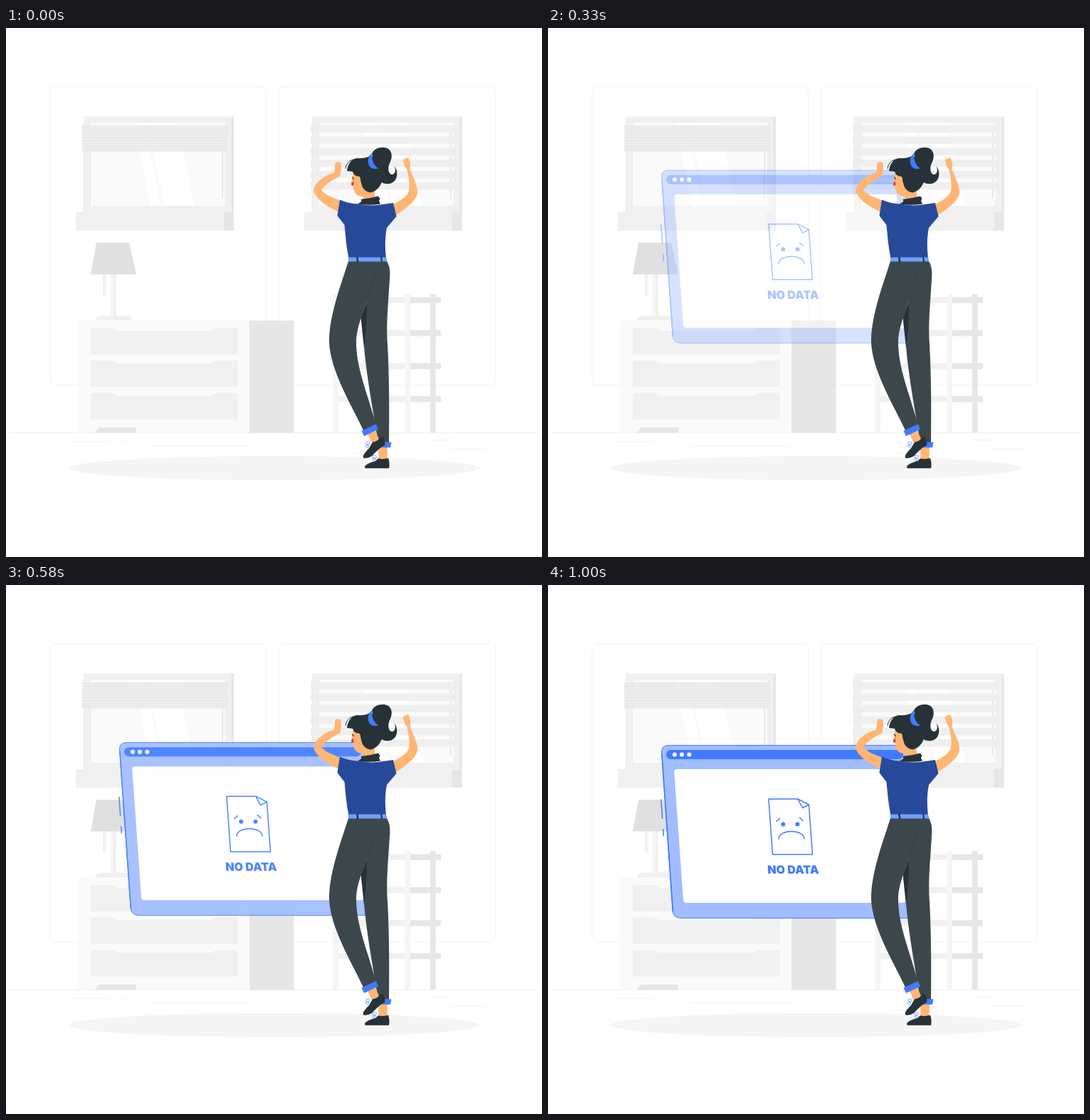
Animation, 753 px wide and 744 px high, one loop 1.04 s. Source, as an HTML page:

```html
<!DOCTYPE html>
<html lang="en">
<head>
<meta charset="utf-8">
<title>No data</title>
<style>
  html, body { margin: 0; width: 100%; height: 100%; overflow: hidden; background: #fff; }
  svg { display: block; width: 753px; height: 744px; }
  .skin { fill: #ffb573; }
  .dark { fill: #263238; }
  .pants { fill: #3c474c; }
  .blue { fill: #407bff; }
  .line { fill: none; stroke: #407bff; stroke-width: 1.5; stroke-linecap: round; stroke-linejoin: round; }
  text { font: 900 16px Inter, "DejaVu Sans", sans-serif; text-anchor: middle; }
</style>
</head>
<body>
<svg viewBox="0 0 753 744" xmlns="http://www.w3.org/2000/svg">
  <g fill="none" stroke="#f3f3f3">
    <rect x="62" y="82.5" width="303.5" height="419.5" rx="8"/>
    <rect x="383.5" y="82.5" width="304" height="419.5" rx="8"/>
    <path d="M5 569.5H748" stroke="#efefef"/>
    <path d="M93 581.5H147M160 581.5H168M200 588H340M597 579.5H623M624 592.5H673M488 598H503"/>
  </g>

  <defs>
    <g id="pane">
      <path fill="#f0f0f0" d="M109 124.5H317V285H109Z"/>
      <path fill="#e6e6e6" d="M316.5 124.5H320V285H306V259H316.5Z"/>
      <path fill="#e9e9e9" d="M109 133H110V259H109ZM117.5 133H119V250H117.5Z"/>
      <path fill="#fafafa" d="M119 133H308V250H119Z"/>
      <path fill="#fff" d="M179 133H194L218 250H203ZM198 133H240L265 250H223Z"/>
      <path fill="#f0f0f0" d="M98 259H306V285H98Z"/>
      <path fill="#e3e3e3" d="M303.5 145H305V240H303.5Z"/>
    </g>
  </defs>
  <use href="#pane"/>
  <use href="#pane" x="320.6"/>
  <g id="blinds"></g>

  <!-- shelf -->
  <g id="shelf">
    <path fill="#e6e6e6" d="M596 374H603.5V569H596Z"/>
    <path fill="#f5f5f5" d="M459.5 374H467V569H459.5ZM560.5 374H568V569H560.5Z"/>
  </g>

  <!-- lamp -->
  <path fill="#f0f0f0" d="M136 346H140.5V376H136ZM125 411.5Q126 404.5 133 404.5H169Q176 404.5 177 411.5Z"/>
  <path fill="#f5f5f5" d="M147 346H154.500V405H147Z"/>
  <path fill="#f0f0f0" d="M151 346H154.500V405H151Z"/>
  <path fill="#e0e0e0" d="M127 302H173L183 346.500H119Z"/>

  <!-- dresser -->
  <path fill="#fafafa" d="M101.500 411.500H342V569.500H101.500Z"/>
  <path fill="#e6e6e6" d="M342 411.500H404.500V569.500H342ZM131 562H183V569.500H124Z"/>
  <g id="drawers" fill="#f0f0f0"></g>

  <ellipse cx="376.500" cy="619" rx="288.500" ry="17" fill="#f5f5f5"/>

  <g id="screen">
    <path d="M169 225.500H496Q504 225.500 505 235L519 459Q519.500 468.500 511 468.500H187Q176 468.500 175 458L159.500 236Q159 225.500 169 225.500Z" fill="#a0bdff" stroke="#407bff"/>
    <path d="M160 238L175.500 459" class="line" stroke-width="1.200"/>
    <rect class="blue" x="166" y="232" width="333" height="13" rx="6.500"/>
    <g fill="#fff">
      <circle cx="178" cy="238.500" r="3"/>
      <circle cx="188" cy="238.500" r="3"/>
      <circle cx="198.300" cy="238.500" r="3"/>
      <path d="M181 259H486Q490 259 490.300 263L503 443Q503 447 499 447H194.500Q190.500 447 190 443L177.300 263Q177 259 181 259Z"/>
    </g>
    <g class="line">
      <path d="M158.800 302L160.700 328M161.800 343.500L162.400 352.500"/>
      <path d="M310 301H351L366.500 309L371.500 379H315.500ZM351 301L357.500 313.500L366.500 309"/>
      <path d="M321 332.500L325.300 328.300M353.500 327.500L358 331.500M324 357C324 343 360 343 360 357"/>
    </g>
    <g class="blue">
      <circle cx="330.300" cy="336.500" r="3"/>
      <circle cx="350.500" cy="336.500" r="3"/>
      <text transform="translate(344.800 406.300) skewX(4)">NO DATA</text>
    </g>
  </g>

  <!-- legs -->
  <path class="skin" d="M523 588H536L535.500 607H523.500Z"/>
  <path class="dark" d="M504 618C503.500 614 512 611 519 609L523 605.500Q530 607 537 605Q539.500 612 538 619.300H505Z"/>
  <path class="dark" d="M509 380L498.500 407L503 450L509 430Z"/>
  <path class="pants" d="M505 328H535Q540 336 539.300 348C537 390 534 412 536 445C538.500 490 538.500 540 538 583H523C515 535 506 485 503 448C506 430 507 405 507 384Z"/>
  <path class="blue" d="M524 582L541.500 582.500L540 590L524 590Z"/>
  <path class="pants" d="M481 328H528L520 345L507 384C504 396 492 420 492 442C492 478 508 515 520 558L502 566C487 533 455 482 454 441C454 404 471 360 481 328Z"/>
  <path d="M519 345L507 384" stroke="#344046" fill="none"/>
  <path class="skin" d="M508 571L519 566L524 578L514 584Z"/>
  <path class="dark" d="M502 604.500C500.500 600 506 596 510 591L515 582.500Q522 581 528.500 574.500Q533.500 580 532 587C525 590 520 596 514 602Q507 606.500 502 604.500Z"/>
  <path class="blue" d="M499.500 566.500L520 557L523 564.500L503 574Z"/>
  <g fill="none" stroke="#70a0ff">
    <ellipse cx="508.500" cy="584" rx="2.800" ry="2"/>
    <ellipse cx="507.500" cy="588" rx="2" ry="1.600"/>
    <ellipse cx="517.500" cy="603" rx="2.800" ry="2"/>
    <ellipse cx="517" cy="606.500" rx="2" ry="1.500"/>
  </g>

  <!-- arms and torso -->
  <path class="skin" d="M463 189Q467 187 470.500 190L471 196L469.500 208C461 212 448 220 443 228C450 236 461 239 470 243L468 259C453 252 439 244 433 232C429 222 444 208 460 204C463 200 461 194 463 189Z"/>
  <path class="skin" d="M557.500 185.500L565 182L568.300 190L567.500 199C572 211 579 222 578 233C575 245 560 255 548 263L544 248C553 243 564 237 566 229C568 219 565 207 563 198C559 195 559 189 557.500 185.500Z"/>
  <path class="skin" d="M502 226H517L519 241H502Z"/>
  <path fill="#264a99" d="M469 241.500Q481 247 495 247.500Q512 251 526 248.500L544 246L548.500 265L535 281C532 296 532.500 309 534 324H481.500C478 308 477 292 475.500 277L465.500 264Z"/>
  <path class="dark" d="M498.500 241Q510 240 523 236.500L525.500 240L524 243L526 247.500Q511 250 494 247.500L499.500 244Z"/>
  <path fill="#70a0ff" d="M481 322.500H534L535.500 328.500H481Z"/>
  <path class="dark" d="M492 322H494.500L495.500 329H493ZM526 322H528L529 329H527Z"/>

  <!-- head -->
  <path class="skin" d="M488 201L486.500 212L484.500 219L487.500 221C488 231 491 236.500 501 237C511 237 516 231 517 224L510 203Z"/>
  <path d="M485 218.500L488 215.500L488.500 221L485.500 222Z" fill="#f02d43"/>
  <path d="M486.500 209.500L488.500 213" stroke="#263238" stroke-width="1.300"/>
  <path class="dark" d="M479 201C480 192 485 184 493 183Q503 184 511 180L524 183Q532 194 531 207C528 220 523 229 512 231.500Q501 230 499 218L497 209Q489 209 487 202Z"/>
  <path d="M477 198C478 190 483 185 490 185" fill="none" stroke="#263238"/>
  <ellipse class="skin" cx="494.500" cy="214" rx="3.600" ry="5.500"/>
  <path class="dark" d="M514 177C517 168 530 166 537 170C544 175 542 184 539 190C536 197 537 204 541 206C547 207 548 200 545.500 194C551 201 550 210 546 215C541 220 533 221 526 216L520 195Z"/>
  <path class="blue" d="M515 175.500C508 180 507 189 511 195Q516 200 523 197.500C515 192 513 183 515 175.500Z"/>
</svg>

<script>
  const LOOP = 1040, STEP = 1000 / 24;
  const $ = id => document.getElementById(id);
  const range = (n, fn) => Array.from({ length: n }, (_, i) => fn(i)).join('');
  const bar = (x, y, w, h, fill, opacity = 1) =>
    `<rect x="${x}" y="${y}" width="${w}" height="${h}" fill="${fill}" opacity="${opacity}"/>`;

  $('blinds').innerHTML =
    bar(107, 137, 205, 37, '#ebebeb', .85) +
    range(9, i => bar(107 + i % 2, 138 + i * 4, 205, 1.2, '#e3e3e3', .7)) +
    range(6, i => bar(428, 136.500 + i * 16.100, 205, 10.500, '#eeeeee', .92));

  $('shelf').innerHTML += range(4, i => {
    const y = 378.500 + i * 46.400;
    return bar(467, y, 93.500, 8.500, '#f0f0f0') + bar(568, y, 43, 8.500, '#e6e6e6');
  });

  $('drawers').innerHTML = range(3, i =>
    `<path transform="translate(0 ${i * 45.800})" d="M119 422H148Q153 422 156 426H289Q292 422 297 422H325.500V459H119Z"/>`);

  const drop = $('screen').animate([
    { opacity: 0, transform: 'translateY(-45px)' },
    { opacity: 1, transform: 'translateY(0px)' }
  ], { duration: 1000, fill: 'both', easing: 'cubic-bezier(.36, -.01, .5, 1.38)' });
  drop.pause();

  // The motion advances 24 times a second, half a step ahead.
  const start = performance.now();
  function draw() {
    const t = (performance.now() - start) % LOOP;
    const step = Math.min(24, Math.floor((t + 4) / STEP));
    drop.currentTime = Math.min(1000, (step + .5) * STEP);
    requestAnimationFrame(draw);
  }
  draw();
</script>
</body>
</html>
```
